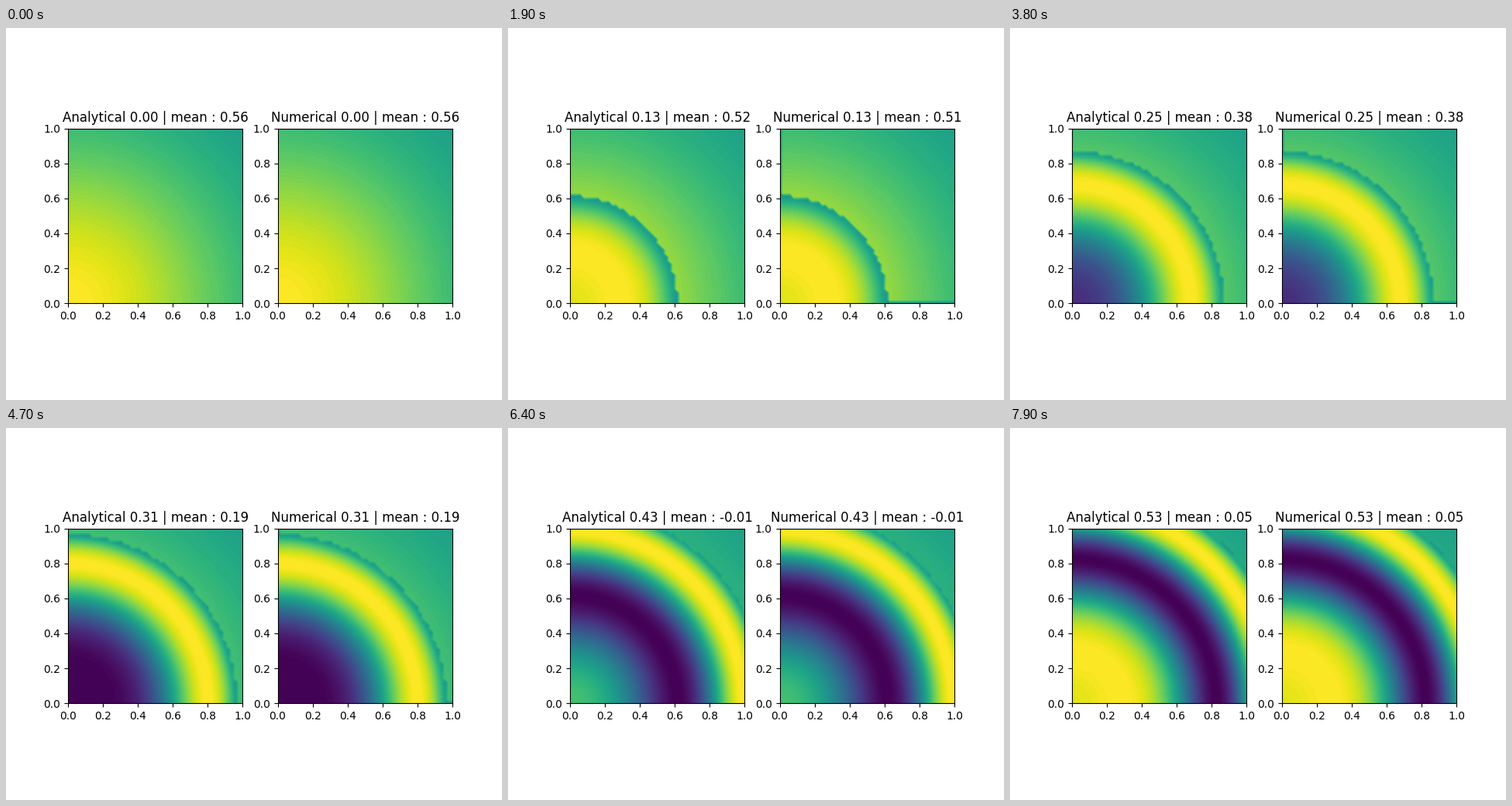
Write a matplotlib script that moves like this. It is 640x480 px and loops after 8000 ms.

```python
import numpy as np
import matplotlib.pyplot as plt
from matplotlib.animation import FuncAnimation

FRAMES = 80
DT = 1 / 150
SPREAD = 3.0             # squared front radius gained per unit time
OMEGA = 5 * np.pi        # angular frequency of the pulse at the corner
LEVELS = np.linspace(-1, 1, 100)

axis = np.linspace(0, 1, 50)
X, Y = np.meshgrid(axis, axis)
R2 = X**2 + Y**2
START = np.exp(-R2)


def analytical(t):
    wave = np.sin(OMEGA * (t - R2 / SPREAD))
    return np.where(R2 < SPREAD * t, wave, START)


def numerical(t):
    """Same field, but the inflow edges stay at zero ahead of the front."""
    field = analytical(t)
    if t > 0:
        edge = (X == 0) | (Y == 0)
        field[edge & (R2 >= SPREAD * t)] = 0
    return field


fig, axes = plt.subplots(1, 2, figsize=(6.4, 4.8), dpi=100)
for ax in axes:
    ax.set_aspect("equal")
    ax.set(xlim=(0, 1), ylim=(0, 1))

panels = list(zip(axes, ("Analytical", "Numerical"), (analytical, numerical)))
fills = []


def update(i):
    t = i * DT
    while fills:
        fills.pop().remove()
    for ax, name, solve in panels:
        field = solve(t)
        fills.append(ax.contourf(X, Y, field, LEVELS, cmap="viridis",
                                 vmin=-1, vmax=1))
        ax.set_title(f"{name} {t:.2f} | mean : {field.mean():.2f}")
    return fills


anim = FuncAnimation(fig, update, frames=FRAMES, interval=100,
                     repeat=True, repeat_delay=0, blit=False)
plt.show()
```
